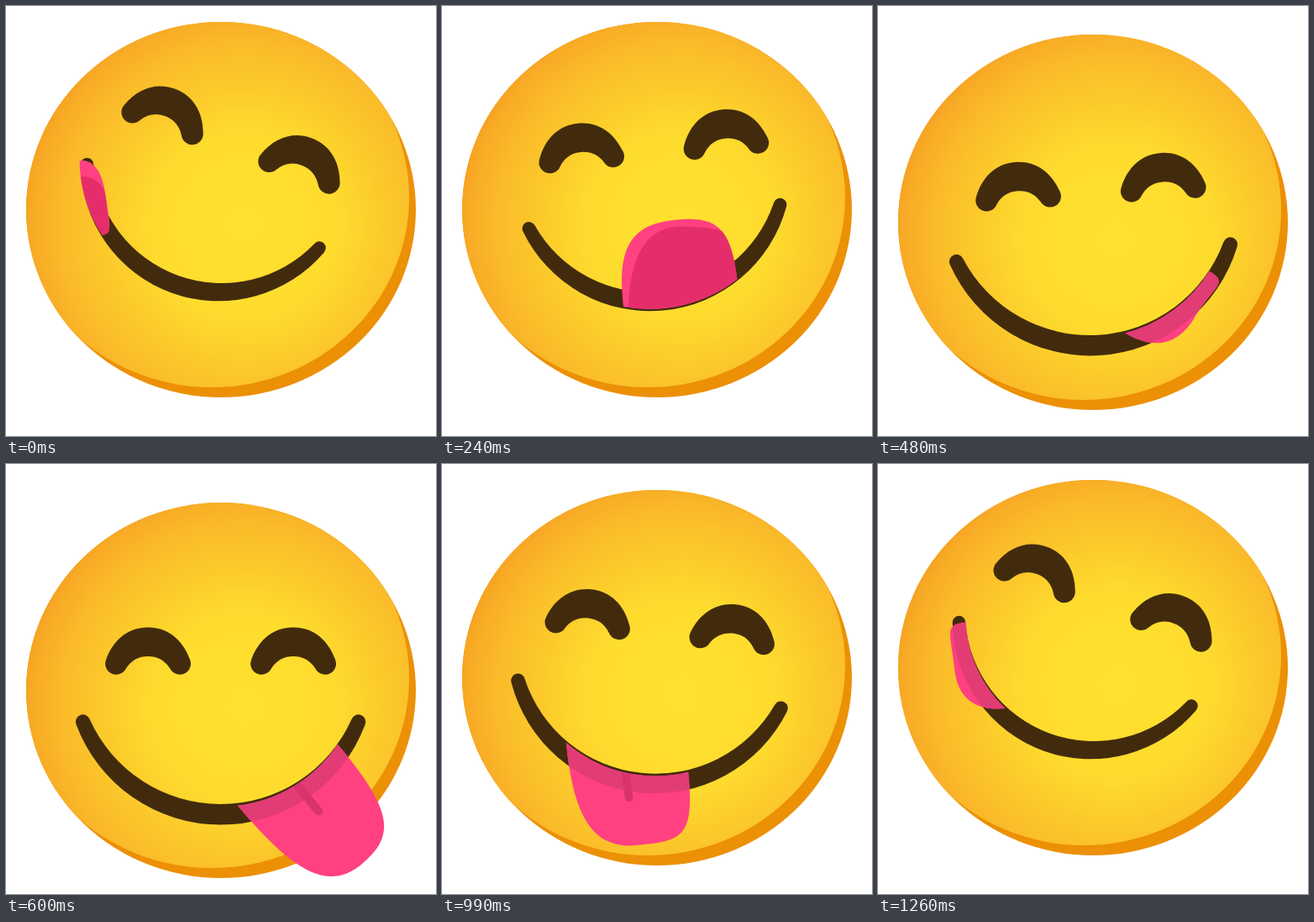
Animation, 512 px wide and 512 px high, one loop 1290 ms. Source, as an HTML page with a canvas:

```html
<!DOCTYPE html>
<html lang="en">
<head>
<meta charset="utf-8">
<title>Yummy face</title>
<style>
html, body { margin: 0; width: 100%; height: 100%; overflow: hidden; background: #fff; }
canvas { display: block; }
</style>
</head>
<body>
<canvas id="stage" width="512" height="512"></canvas>
<script>
const ctx = document.getElementById('stage').getContext('2d');
const LOOP = 1290, STEP = 30, FLIP = 465;
const DARK = '#422b0d', PINK = '#ff4181', DEEP = '#e52d6b', SHADE = '#e23c74', CREASE = '#d8346b';

// Smile: centre of its arc above the chord, inner and outer radius
const ARC_Y = -67, R_IN = 168, R_OUT = 187;

// time, face drop
const DROP = [[0, 0], [270, 0], [360, 2], [480, 15], [630, 28], [810, 19], [990, 12], [1140, 0]];

// time, tilt in degrees, eye height, squeeze of the smile
const POSE = [
  [0, 19.8, 169.3, .322],
  [240, -5.4, 175.3, .29],
  [360, -7.2, 199.3, .173],
  [600, 0, 238.5, 0],
  [810, 0, 228, 0],
  [990, 6, 202, .2],
  [1260, 19.8, 169.3, .322]
];

// Tongue above the smile: time, base from and to (angles), tip angle, tip radius, rim, inset
const LICK = [
  [0, -1.21, -.65, -.91, 160, .1, .2],
  [240, -.277, .56, .285, 77, .13, .04],
  [360, .1, .854, .557, 124, .4, .08],
  [480, .2, .95, .65, 178, .4, .08]
];

// Tongue below it: time, base from and to, tip angle, tip radius
const HANG = [
  [450, .2, .95, .65, 180],
  [600, .121, .979, .619, 290],
  [810, .122, .983, .655, 297],
  [990, -.612, .352, .011, 255],
  [1260, -1.18, -.414, -.866, 195.6]
];

// Monotone cubic through the keys, component by component
function sample(keys, t) {
  const last = keys.length - 1;
  if (t <= keys[0][0]) return keys[0].slice(1);
  if (t >= keys[last][0]) return keys[last].slice(1);
  let i = 0;
  while (keys[i + 1][0] <= t) i++;
  const span = keys[i + 1][0] - keys[i][0], u = (t - keys[i][0]) / span, w = 1 - u;
  const rate = (n, c) => (keys[n + 1][c] - keys[n][c]) / (keys[n + 1][0] - keys[n][0]);
  const slope = (n, c) => {
    if (n === 0 || n === last) return 0;
    const a = rate(n - 1, c), b = rate(n, c);
    return a * b > 0 ? 2 * a * b / (a + b) : 0;
  };
  return keys[i].slice(1).map((v, k) => {
    const c = k + 1;
    return v * w * w * (1 + 2 * u) + keys[i + 1][c] * u * u * (3 - 2 * u)
      + span * (slope(i, c) * u * w * w - slope(i + 1, c) * u * u * w);
  });
}

const polar = (a, r) => [r * Math.sin(a), ARC_Y + r * Math.cos(a)];
const mix = (p, q, k) => p.map((v, i) => v + (q[i] - v) * k);
const add = (p, q, k) => p.map((v, i) => v + q[i] * k);

// Rounded tongue: sides leave the base along its axis and bend into the tip
function tonguePath(a, b, tip, r) {
  const A = polar(a, r), B = polar(b, r);
  const axis = add(tip, mix(A, B, .5), -1), len = Math.hypot(...axis);
  const half = Math.hypot(...add(B, A, -1)) / 2;
  let side = [-axis[1] / len, axis[0] / len];
  if (side[0] * (B[0] - A[0]) + side[1] * (B[1] - A[1]) < 0) side = [-side[0], -side[1]];
  return new Path2D(`M${A}C${add(A, axis, .75)} ${add(tip, side, -.75 * half)} ${tip}` +
    `C${add(tip, side, .75 * half)} ${add(B, axis, .75)} ${B}A${r} ${r} 0 0 1 ${A}Z`);
}

const EYE = new Path2D('M-50,-5.5C-41,-30 -23,-44 0,-44C23,-44 41,-30 50,-5.5' +
  'A13 13 0 0 1 26.5,5.5C20,-5 11,-9.5 0,-9.5C-11,-9.5 -20,-5 -26.5,5.5A13 13 0 0 1 -50,-5.5Z');
const SMILE = new Path2D('M-172,3.2A183.6 183.6 0 0 0 172,3.2A8.5 8.5 0 0 0 156,-3.2' +
  'A170.8 170.8 0 0 1 -156,-3.2A8.5 8.5 0 0 0 -172,3.2Z');

const skin = ctx.createRadialGradient(284, 262, 0, 284, 262, 272);
[[0, '#ffe12f'], [.4, '#fedc2e'], [.6, '#fccb2b'], [.8, '#fabb2a'], [.93, '#f8ab26'], [1, '#f59d20']]
  .forEach(([p, c]) => skin.addColorStop(p, c));

function fill(path, color) {
  ctx.fillStyle = color;
  ctx.fill(path);
}

function oval(x, y, rx, ry) {
  const p = new Path2D();
  p.ellipse(x, y, rx, ry, 0, 0, Math.PI * 2);
  return p;
}

const HEAD = oval(256, 242.5, 232, 223.5), FRONT = oval(245, 228, 235, 226);

function drawHead(drop) {
  ctx.save();
  ctx.translate(0, drop);
  fill(HEAD, '#ec9006');
  ctx.clip(HEAD);
  fill(FRONT, skin);
  ctx.restore();
}

function drawLick(t) {
  const [a, b, tipA, tipR, rim, inset] = sample(LICK, t);
  const A = polar(a, R_OUT), B = polar(b, R_OUT), tip = polar(tipA, tipR);
  const tongue = tonguePath(a, b, tip, R_OUT);
  const inner = add(mix(tip, mix(A, B, .5), rim), add(B, A, -1), .12);
  fill(tongue, PINK);
  ctx.clip(tongue);
  fill(tonguePath(a + inset * (b - a), b, inner, R_OUT), DEEP);
}

function drawHang(t) {
  const [a, b, tipA, tipR] = sample(HANG, t);
  const tip = polar(tipA, tipR), root = polar((a + b) / 2 + .02, R_IN + 3);
  const tongue = tonguePath(a, b, tip, R_IN);
  fill(tongue, PINK);
  ctx.clip(tongue);
  fill(SMILE, SHADE);
  ctx.globalAlpha = Math.max(0, Math.min(1, (tipR - 200) / 40));
  ctx.strokeStyle = CREASE;
  ctx.lineWidth = 10;
  ctx.lineCap = 'round';
  ctx.beginPath();
  ctx.moveTo(...root);
  ctx.lineTo(...mix(root, tip, .32));
  ctx.stroke();
}

function draw(t) {
  const [tilt, eyeY, squeeze] = sample(POSE, t), size = 1 - squeeze * squeeze;
  ctx.fillStyle = '#fff';
  ctx.fillRect(0, 0, 512, 512);
  drawHead(sample(DROP, t)[0]);
  ctx.save();
  ctx.translate(255.6 + .59 * tilt, eyeY);
  ctx.rotate(tilt * Math.PI / 180);
  for (const x of [-86.5, 86.5]) {
    ctx.translate(x, 0);
    fill(EYE, DARK);
    ctx.translate(-x, 0);
  }
  ctx.translate(-22.5 * squeeze, 68.5 + 23 * squeeze);
  ctx.scale(size, size);
  fill(SMILE, DARK);
  (t < FLIP ? drawLick : drawHang)(t);
  ctx.restore();
}

const start = performance.now();
function tick() {
  const t = (performance.now() - start) % LOOP;
  draw(Math.floor(t / STEP) * STEP);
  requestAnimationFrame(tick);
}
tick();
</script>
</body>
</html>
```
